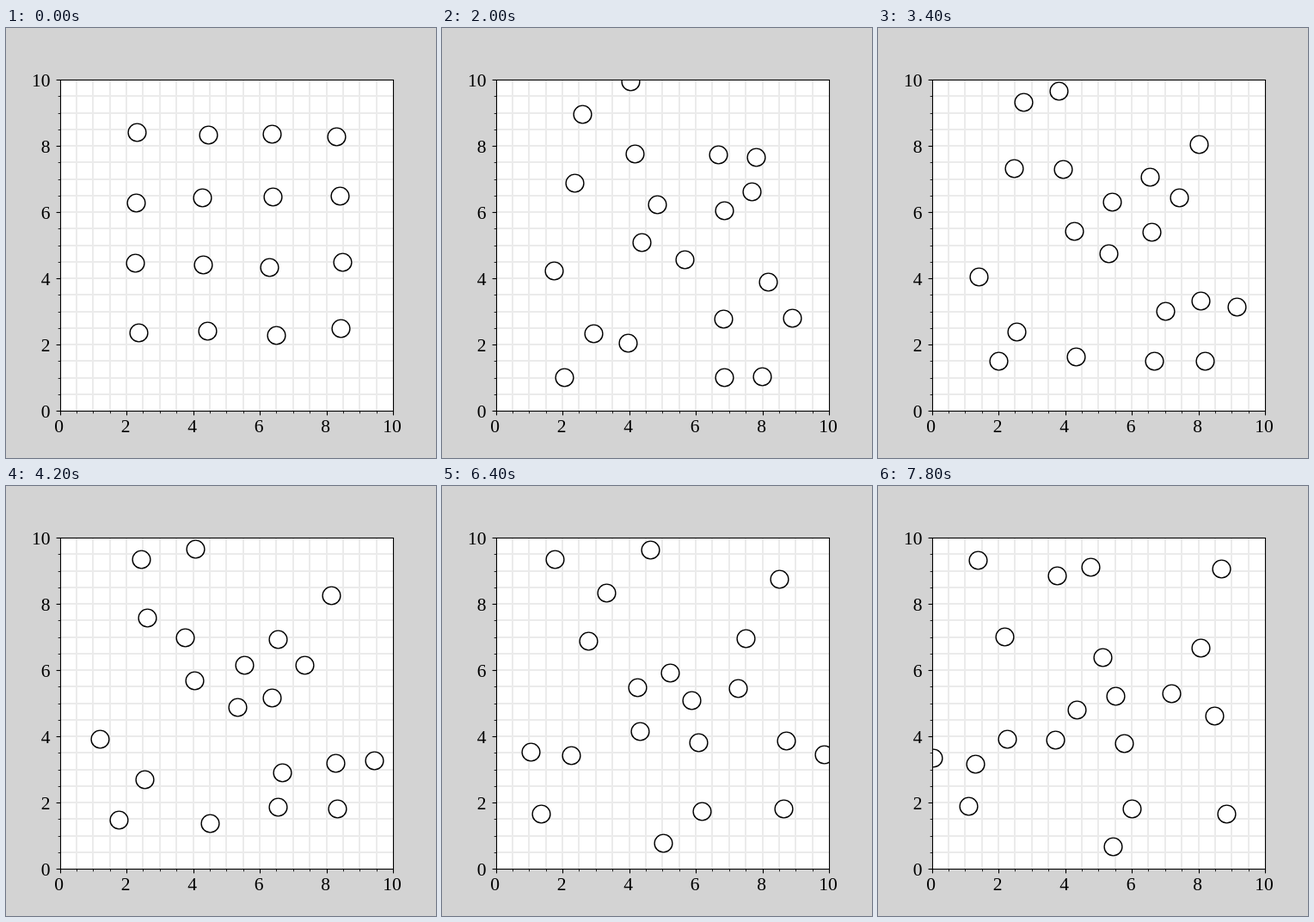
An HTML page with a canvas that plays this animation: 500 by 500 pixels, repeating every 8 s.

```html
<!DOCTYPE html>
<html lang="en">
<head>
<meta charset="utf-8">
<title>Particles in a periodic box</title>
<style>
html, body { margin: 0; width: 100%; height: 100%; overflow: hidden; background: #d3d3d3; }
canvas { display: block; width: 500px; height: 500px; }
</style>
</head>
<body>
<canvas id="stage" width="500" height="500"></canvas>
<script>
const ctx = document.getElementById("stage").getContext("2d");
const STEP_MS = 200, STEPS = 40;
const BOX = 10, DT = 0.02, SUBSTEPS = 3;
const LEFT = 63, TOP = 60, RIGHT = 450, BOTTOM = 445;
const toX = x => 62.5 + x * 38.75;
const toY = y => BOTTOM - y * 38.5;

// Offset from the lattice site (x, y) and heading in degrees; rows run upwards.
const START = [
  [[.374, .351, 0], [.439, .403, 212.5], [.503, .273, 59], [.439, .481, 26]],
  [[.271, .455, 204.6], [.31, .403, 89], [.297, .325, 160], [.49, .481, 240.5]],
  [[.297, .273, 85.4], [.284, .429, 343], [.4, .455, 309.5], [.413, .481, 179]],
  [[.323, .403, 65.4], [.465, .325, 241], [.374, .351, 292], [.31, .273, 231]],
  [[.271, .429, 115.3], [.49, .35, 225], [.477, .429, 61], [.39, .455, 116]],
];

const particles = START.flatMap((row, j) => row.map(([dx, dy, heading], i) => {
  const angle = heading * Math.PI / 180;
  return {
    x: 2 * (i + 1) + dx, y: 2 * (j + 1) + dy,
    vx: Math.cos(angle), vy: Math.sin(angle), ax: 0, ay: 0
  };
}));

const nearest = d => d - BOX * Math.round(d / BOX);
const wrap = v => v - BOX * Math.floor(v / BOX);

// Lennard-Jones forces between nearest periodic images.
function applyForces() {
  for (const p of particles) p.ax = p.ay = 0;
  particles.forEach((p, i) => {
    for (const q of particles.slice(i + 1)) {
      const dx = nearest(p.x - q.x), dy = nearest(p.y - q.y);
      const r2 = dx * dx + dy * dy, s6 = 1 / r2 ** 3;
      const f = 24 * s6 * (2 * s6 - 1) / r2;
      p.ax += f * dx; p.ay += f * dy;
      q.ax -= f * dx; q.ay -= f * dy;
    }
  });
}

function kick() {
  for (const p of particles) {
    p.vx += p.ax * DT / 2;
    p.vy += p.ay * DT / 2;
  }
}

function advance() {
  kick();
  for (const p of particles) {
    p.x = wrap(p.x + p.vx * DT);
    p.y = wrap(p.y + p.vy * DT);
  }
  applyForces();
  kick();
}

function simulate() {
  const poses = [];
  applyForces();
  for (let step = 0; step < STEPS; step++) {
    poses.push(particles.map(({ x, y }) => [toX(x), toY(y)]));
    for (let n = 0; n < SUBSTEPS; n++) advance();
  }
  return poses;
}

const poses = simulate();

function line(x1, y1, x2, y2, width, color) {
  ctx.strokeStyle = color;
  ctx.lineWidth = width;
  ctx.beginPath();
  ctx.moveTo(x1, y1);
  ctx.lineTo(x2, y2);
  ctx.stroke();
}

function drawGrid() {
  ctx.fillStyle = "#fff";
  ctx.fillRect(LEFT, TOP, RIGHT - LEFT, BOTTOM - TOP);
  for (let v = 0.5; v < BOX; v += 0.5) {
    const x = Math.round(toX(v)), y = Math.round(toY(v));
    line(x, TOP, x, BOTTOM, 2, "#ebebeb");
    line(LEFT, y, RIGHT, y, 2, "#ebebeb");
  }
}

function drawParticles(pose) {
  ctx.save();
  ctx.beginPath();
  ctx.rect(LEFT, TOP, RIGHT - LEFT, BOTTOM - TOP);
  ctx.clip();
  ctx.fillStyle = "#fff";
  ctx.strokeStyle = "#000";
  ctx.lineWidth = 1.39;
  for (const [x, y] of pose) {
    ctx.beginPath();
    ctx.arc(Math.floor(x) + 0.5, Math.floor(y) + 0.5, 10.4, 0, 2 * Math.PI);
    ctx.fill();
    ctx.stroke();
  }
  ctx.restore();
}

function drawAxes() {
  ctx.strokeStyle = "#000";
  ctx.lineWidth = 1.11;
  ctx.strokeRect(63.5, 60.5, 387, 385);
  ctx.fillStyle = "#000";
  ctx.font = '21.5px "Liberation Serif", serif';
  for (let v = 0; v <= BOX; v += 0.5) {
    const major = v % 2 === 0;
    const length = major ? 4.9 : 2.8, width = major ? 1.11 : 0.83;
    const x = Math.round(toX(v)) + 0.5, y = Math.round(toY(v)) + 0.5;
    line(x, 445.5, x, 445.5 + length, width, "#000");
    line(63.5, y, 63.5 - length, y, width, "#000");
    if (major) {
      ctx.textAlign = "center";
      ctx.fillText(v, toX(v) - 1, 470);
      ctx.textAlign = "right";
      ctx.fillText(v, 51.5, toY(v) + 8);
    }
  }
}

function draw(now) {
  ctx.fillStyle = "#d3d3d3";
  ctx.fillRect(0, 0, 500, 500);
  drawGrid();
  drawParticles(poses[Math.floor(now / STEP_MS) % STEPS]);
  drawAxes();
}

let start;
function tick(now) {
  start ??= now;
  draw(now - start);
  requestAnimationFrame(tick);
}
draw(0);
requestAnimationFrame(tick);
</script>
</body>
</html>
```
